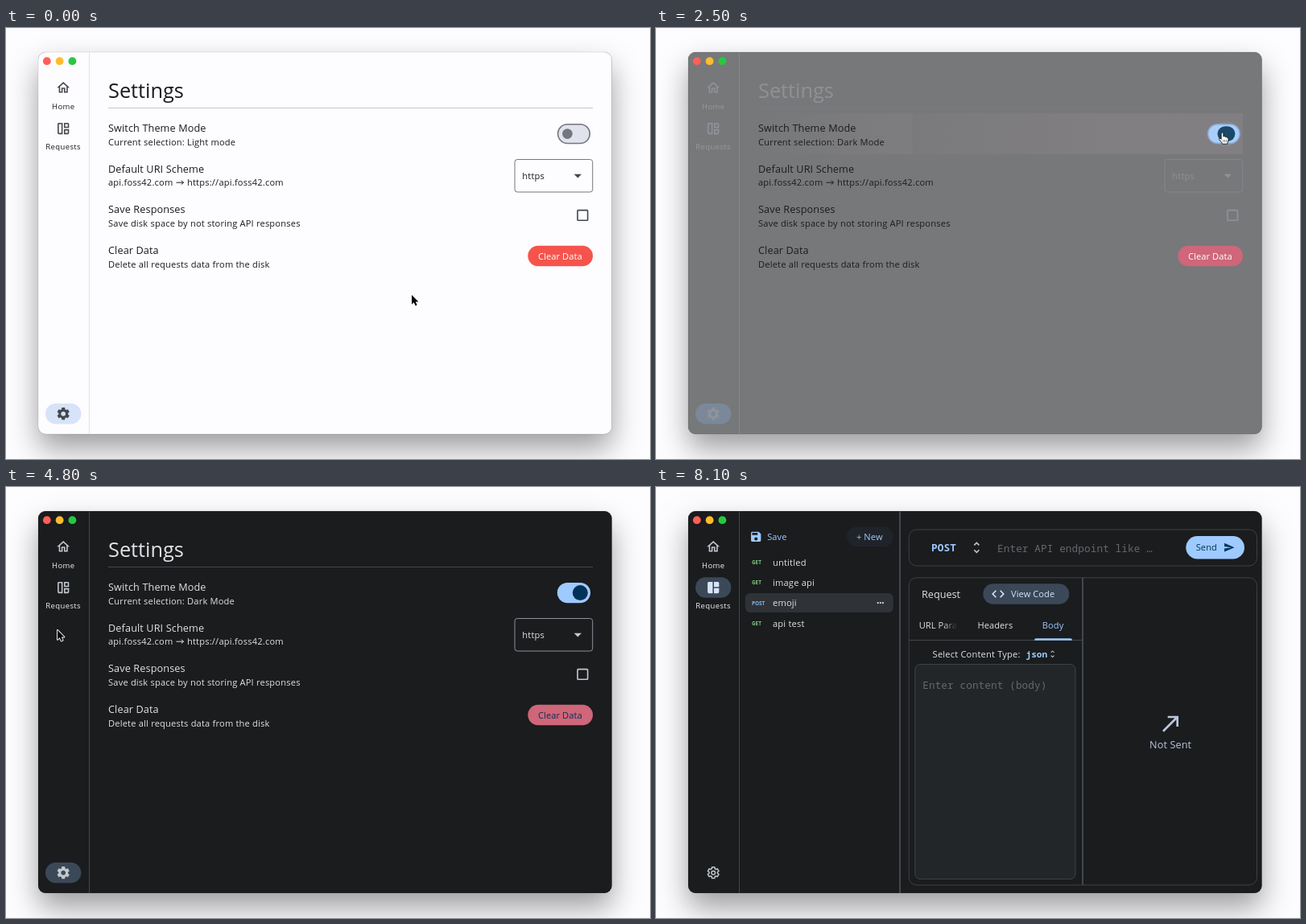
Animation, 800 px wide and 536 px high, one loop 8.79 s. Source, as an HTML page with a canvas:

```html
<!DOCTYPE html>
<html lang="en">
<head>
<meta charset="utf-8">
<title>Settings</title>
<style>
  html, body { margin: 0; width: 100%; height: 100%; overflow: hidden; background: #fdfdff; }
  canvas { display: block; width: 800px; height: 536px; }
</style>
</head>
<body>
<canvas id="stage"></canvas>
<script>
const W = 800, H = 536, LOOP = 8790, STEP = 100;
const canvas = document.getElementById('stage');
const dpr = window.devicePixelRatio || 1;
canvas.width = W * dpr;
canvas.height = H * dpr;
const ctx = canvas.getContext('2d');
const SANS = '"Open Sans", "Noto Sans", sans-serif';
const MONO = '"Noto Sans Mono", "DejaVu Sans Mono", monospace';

const TEXT = '#e2e2e6', BLUE = '#9ecaff', NAVY = '#003258';
const MUTED = '#c3c7cf', LINE = '#43474e', PILL = '#3b4858';

const ICONS = {
  home: 'M12 5.69l5 4.5V18h-2v-6H9v6H7v-7.81l5-4.5M12 3L2 12h3v8h6v-6h2v6h6v-8h3z',
  mosaic: 'M3 5v14c0 1.1.9 2 2 2h6V3H5c-1.1 0-2 .9-2 2zm6 14H5V5h4zM19 3h-6v8h8V5c0-1.1-.9-2-2-2zm0 6h-4V5h4zM13 21h6c1.1 0 2-.9 2-2v-6h-8zm2-6h4v4h-4z',
  mosaicFull: 'M3 5v14c0 1.1.9 2 2 2h6V3H5c-1.1 0-2 .9-2 2zM19 3h-6v8h8V5c0-1.1-.9-2-2-2zM13 21h6c1.1 0 2-.9 2-2v-6h-8z',
  save: 'M17 3H5c-1.1 0-2 .9-2 2v14c0 1.1.9 2 2 2h14c1.1 0 2-.9 2-2V7zM12 19a3 3 0 1 1 0-6 3 3 0 0 1 0 6zM15 9H5V5h10z',
  unfold: 'M12 5.83L15.17 9l1.41-1.41L12 3 7.41 7.59 8.83 9zM12 18.17L8.83 15l-1.41 1.41L12 21l4.59-4.59L15.17 15z',
  send: 'M2 21L23 12 2 3v7l15 2-15 2z',
  code: 'M9.4 16.6L4.8 12l4.6-4.6L8 6l-6 6 6 6zM14.6 16.6l4.6-4.6-4.6-4.6L16 6l6 6-6 6z',
  northEast: 'M9 5v2h6.59L4 18.59 5.41 20 17 8.41V15h2V5z'
};
for (const name in ICONS) ICONS[name] = new Path2D(ICONS[name]);

const ARROW = new Path2D('M0 0V11.8L2.7 9.3 4.6 13.5 6.6 12.6 4.8 8.6H8.4Z');
const HAND = new Path2D('M-1.4 1Q0-1 1.4 1V5Q3 4 4 5.5Q5.5 4.9 6 6.3Q7.8 6 7.6 8.2L7.2 11 6 14.2H0L-1 12.2-4 8.4Q-4 6.5-2.5 7.2L-1.4 8.4Z');

// Pointer waypoints: time, x, y
const POINTER = [
  [0, 504, 332], [100, 514, 322], [300, 600, 215], [500, 658, 136.5], [700, 658, 136.5],
  [900, 682, 133], [1100, 703.5, 130], [4300, 703.5, 130], [4400, 685, 150], [4500, 520, 194],
  [4600, 290, 206], [4700, 110, 206], [4800, 64, 178], [5000, 68, 151], [5200, 71, 137],
  [5300, 71, 137], [5500, 70, 136], [7000, 70, 136], [7100, 75.5, 135.5], [7200, 150, 150],
  [7300, 330, 172], [7400, 520, 184], [7500, 655, 184]
];

const clamp = v => Math.max(0, Math.min(1, v));
const lerp = (a, b, k) => a + (b - a) * k;
const rgb = hex => [1, 3, 5].map(i => parseInt(hex.slice(i, i + 2), 16));
function mix(a, b, k) {
  const to = rgb(b);
  return `rgb(${rgb(a).map((v, i) => Math.round(lerp(v, to[i], k)))})`;
}

function text(str, x, y, color, size = 11.08, spacing = 0.2, font = SANS, weight = 400) {
  ctx.font = `${weight} ${size}px ${font}`;
  ctx.letterSpacing = spacing + 'px';
  ctx.fillStyle = color;
  ctx.fillText(str, x, y);
}

function box(x, y, w, h, r, fill, stroke, line = 1) {
  ctx.beginPath();
  ctx.roundRect(x, y, w, h, r);
  if (fill) { ctx.fillStyle = fill; ctx.fill(); }
  if (stroke) { ctx.strokeStyle = stroke; ctx.lineWidth = line; ctx.stroke(); }
}

function rect(x, y, w, h, color) {
  ctx.fillStyle = color;
  ctx.fillRect(x, y, w, h);
}

function disc(x, y, r, color) {
  ctx.beginPath();
  ctx.arc(x, y, r, 0, Math.PI * 2);
  ctx.fillStyle = color;
  ctx.fill();
}

function icon(name, cx, cy, size, color) {
  ctx.save();
  ctx.translate(cx - size / 2, cy - size / 2);
  ctx.scale(size / 24, size / 24);
  ctx.fillStyle = color;
  ctx.fill(ICONS[name], 'evenodd');
  ctx.restore();
}

function gear(cx, cy, color, filled) {
  const outer = filled ? 7.9 : 7.1, inner = filled ? 5.9 : 5.2, hole = filled ? 2.8 : 2.3;
  const deg = Math.PI / 180;
  ctx.beginPath();
  for (let tooth = 0; tooth < 6; tooth++) {
    for (const [r, a] of [[inner, -22], [outer, -14], [outer, 14], [inner, 22]]) {
      const angle = (tooth * 60 + 90 + a) * deg;
      ctx.lineTo(cx + r * Math.cos(angle), cy + r * Math.sin(angle));
    }
  }
  ctx.closePath();
  ctx.moveTo(cx + hole, cy);
  ctx.arc(cx, cy, hole, 0, Math.PI * 2);
  ctx.lineJoin = 'round';
  ctx.lineWidth = 1.5;
  ctx.fillStyle = ctx.strokeStyle = color;
  if (filled) ctx.fill('evenodd'); else ctx.stroke();
}

function drawWindow(p) {
  rect(0, 0, W, H, '#fdfdff');
  ctx.save();
  ctx.shadowColor = 'rgba(0,0,0,.38)';
  ctx.shadowBlur = 36 * dpr;
  ctx.shadowOffsetY = 18 * dpr;
  box(40, 30, 712.5, 475, 9, '#888888');
  ctx.restore();
  box(40, 30, 712.5, 475, 9, mix('#fdfcff', '#1a1c1e', p), 'rgba(0,0,0,.14)', 0.7);
  ['#ff5f57', '#febc2e', '#28c840'].forEach((c, i) => disc(50.8 + i * 15.8, 41.2, 4.9, c));
}

function drawRail(t, p) {
  const onRequests = t >= 5700;
  const label = mix('#1a1c1e', '#f0f0f4', p);
  const tint = mix('#43474e', MUTED, p);
  const navTint = p > 0 && p < 0.5 ? '#0c0d0f' : tint;
  rect(103, 30.5, 1, 474.5, mix('#e2e2e6', '#43474e', p));
  if (onRequests) {
    box(49, 112.3, 44.4, 25.4, 12.7, PILL);
    const splash = clamp((6200 - t) / 500) * 0.12;
    if (splash) box(49, 112.3, 44.4, 25.4, 12.7, `rgba(215,227,248,${splash})`);
  } else {
    box(49, 467, 44.4, 25.4, 12.7, mix('#d7e3f8', PILL, p));
    if (t >= 5100) box(49, 112.3, 44.4, 25.4, 12.7, 'rgba(195,199,207,.08)');
  }
  icon('home', 71.2, 74.2, 19, navTint);
  icon(onRequests ? 'mosaicFull' : 'mosaic', 71.2, 125, 19, onRequests ? '#d7e3f8' : navTint);
  gear(71.2, 479.7, tint, !onRequests);
  text('Home', 57, 100.6, label, 9.5, 0.4);
  text('Requests', 49.2, 151.2, label, 9.5, 0.4);
}

function drawSwitch(t, p) {
  const q = clamp((t - 2250) / 300) * (t >= 2400);
  const hover = t >= 1000 && t < 4400;
  const bump = Math.sin(Math.PI * q);
  const cx = lerp(697.4, 713.3, q * q), cy = 131.6;
  const w = lerp(12.7, 19, q) + 8 * bump, h = lerp(12.7, 19, q) + 2 * bump;
  box(685.6, 119.7, 39.6, 23.8, 11.9, mix('#e0e2ec', BLUE, q), mix('#74777f', BLUE, q ** 3), 1.6);
  if (hover) disc(cx, cy, 15.6, p > 0.5 ? 'rgba(158,202,255,.08)' : 'rgba(26,28,30,.08)');
  const off = hover ? '#43474e' : '#74777f', on = hover ? '#00497d' : NAVY;
  box(cx - w / 2, cy - h / 2, w, h, h / 2, mix(off, on, q ** 3));
}

function drawRipple(t) {
  if (t < 2400 || t >= 2600) return;
  const k = (t - 2400) / 100;
  ctx.save();
  ctx.beginPath();
  ctx.rect(127, 106.3, 602, 50.5);
  ctx.clip();
  const wash = ctx.createLinearGradient(127, 0, 560, 0);
  wash.addColorStop(0, 'rgba(225,200,210,0)');
  wash.addColorStop(1, 'rgba(225,200,210,.15)');
  rect(127, 106, 602, 51, wash);
  disc(703, 131.6, 125 + 260 * k, `rgba(20,20,22,${0.075 - 0.04 * k})`);
  ctx.restore();
}

function drawSettings(t, p) {
  const lag = clamp((t - 2510) / 200);
  const dark = t >= 2400;
  const main = mix('#1a1c1e', TEXT, p), body = mix('#1a1c1e', TEXT, lag);
  const tint = mix('#43474e', MUTED, p), edge = mix('#74777f', '#8d9199', p);
  text('Settings', 127, 86.8, main, 25.33, 0);
  rect(127, 99, 602, 1, mix('#c3c7cf', '#43474e', p));
  drawRipple(t);
  const rows = [
    ['Switch Theme Mode', 'Current selection: ' + (dark ? 'Dark Mode' : 'Light mode')],
    ['Default URI Scheme', 'api.foss42.com'],
    ['Save Responses', 'Save disk space by not storing API responses'],
    ['Clear Data', 'Delete all requests data from the disk']
  ];
  rows.forEach(([title, sub], i) => {
    const y = 129 + i * 50.67;
    text(title, 127, y, body, 12.67, 0.12);
    text(sub, 127, y + 16.7, body);
  });
  text('https://api.foss42.com', 225, 196.4, body);
  ctx.beginPath();
  ctx.moveTo(211.5, 192.2);
  ctx.lineTo(220.5, 192.2);
  ctx.moveTo(217.8, 189.8);
  ctx.lineTo(220.5, 192.2);
  ctx.lineTo(217.8, 194.6);
  ctx.strokeStyle = body;
  ctx.lineWidth = 1;
  ctx.stroke();

  drawSwitch(t, p);
  box(632, 163.5, 96.7, 40.5, 3.2, null, edge);
  text('https', 641.3, 187.7, main);
  ctx.beginPath();
  ctx.moveTo(705.6, 181.8);
  ctx.lineTo(715, 181.8);
  ctx.lineTo(710.3, 186.5);
  ctx.fillStyle = tint;
  ctx.fill();
  box(710, 226.6, 12.6, 12.6, 0.8, null, tint, 1.6);
  box(648.3, 270.8, 80.7, 25.4, 12.7, dark ? '#cf6679' : '#f5544d');
  text('Clear Data', 661, 287.5, mix('#ffffff', NAVY, lag), 11.08, 0.08);
}

function drawSidebar() {
  icon('save', 124.2, 61.8, 16.4, BLUE);
  text('Save', 138.2, 66, BLUE, 11.08, 0.08);
  box(237, 49.5, 58, 24.6, 12.3, '#202329');
  text('+ New', 249, 66, BLUE, 11.08, 0.08);
  box(110.8, 132, 184, 24, 6.3, '#2f3236');
  const items = [['GET', 'untitled'], ['GET', 'image api'], ['POST', 'emoji'], ['GET', 'api test']];
  items.forEach(([verb, name], i) => {
    const y = 97.6 + i * 25.34;
    text(verb, 119, y - 1.5, verb === 'GET' ? '#81c784' : '#82b8f0', 6.33, 0, SANS, 700);
    text(name, 145, y, TEXT);
  });
  for (let i = -1; i <= 1; i++) disc(278.8 + i * 3.1, 144.1, 1.1, TEXT);
  rect(302, 30.5, 2, 474.5, LINE);
}

function drawRequests() {
  drawSidebar();
  box(314.2, 53, 432.3, 45, 9.5, null, '#3c4046');
  text('POST', 342, 80.2, BLUE, 12.67, 0.12, MONO, 600);
  icon('unfold', 398.3, 75.3, 19, MUTED);
  text('Enter API endpoint like …', 424, 80.8, '#65686d', 12.67, 0.12, MONO);
  box(658.3, 61, 72.7, 28.5, 14.25, BLUE);
  text('Send', 670.7, 79.2, NAVY, 11.08, 0.08);
  icon('send', 712, 75.2, 14.25, NAVY);

  box(314.2, 112.8, 432.3, 382.2, 9.5, null, '#3c4046');
  rect(529, 113, 2, 382, LINE);
  text('Request', 330, 137.7, TEXT, 12.67, 0);
  box(406.3, 120.3, 107, 25.4, 12.7, PILL);
  icon('code', 425, 133, 19, '#d7e3f8');
  text('View Code', 441, 137.2, '#d7e3f8', 11.08, 0.08);

  const fade = ctx.createLinearGradient(357, 0, 374, 0);
  fade.addColorStop(0, TEXT);
  fade.addColorStop(1, 'rgba(226,226,230,0)');
  text('URL Params', 326.7, 175.6, fade, 11.08, 0.08);
  text('Headers', 399.4, 175.6, TEXT, 11.08, 0.08);
  text('Body', 479.8, 175.6, BLUE, 11.08, 0.08);
  rect(314.5, 190, 215, 1, LINE);
  box(470, 188.2, 47, 2.6, [2.4, 2.4, 0, 0], BLUE);

  text('Select Content Type:', 343.6, 211.7, TEXT);
  text('json', 459.5, 211.7, BLUE, 11.08, 0, MONO, 600);
  icon('unfold', 492.6, 207.7, 12, MUTED);
  box(321.8, 220.6, 199.2, 267, 6.3, '#232628', '#3f4349');
  text('Enter content (body)', 331.2, 251.2, '#65696e', 12.67, 0.12, MONO);

  icon('northEast', 639.7, 294, 32, '#bbc7db');
  text('Not Sent', 613, 324.6, '#bbc7db', 12.67, 0.12);
}

function drawPointer(t) {
  if (t >= 7600) return;
  let i = POINTER.findIndex(point => point[0] > t);
  if (i < 0) i = POINTER.length - 1;
  const [t0, x0, y0] = POINTER[i - 1], [t1, x1, y1] = POINTER[i];
  const k = clamp((t - t0) / (t1 - t0));
  const hand = (t >= 500 && t < 4400) || (t >= 5100 && t < 7200);
  ctx.save();
  ctx.translate(lerp(x0, x1, k), lerp(y0, y1, k));
  ctx.lineJoin = 'round';
  if (hand) {
    ctx.fillStyle = '#fff';
    ctx.strokeStyle = '#111';
    ctx.lineWidth = 0.9;
    ctx.fill(HAND);
    ctx.stroke(HAND);
    for (let n = 0; n < 3; n++) rect(1 + n * 1.9, 9, 0.6, 3, '#333');
  } else {
    ctx.strokeStyle = '#fff';
    ctx.lineWidth = 1.8;
    ctx.stroke(ARROW);
    ctx.fillStyle = '#000';
    ctx.fill(ARROW);
  }
  ctx.restore();
}

function render(now) {
  const t = Math.floor((now % LOOP) / STEP) * STEP;
  const p = clamp((t - 2382) / 200);
  ctx.setTransform(dpr, 0, 0, dpr, 0, 0);
  drawWindow(p);
  drawRail(t, p);
  if (t < 5700) drawSettings(t, p); else drawRequests();
  drawPointer(t);
}

const start = performance.now();
function tick() {
  render(performance.now() - start);
  requestAnimationFrame(tick);
}
tick();
</script>
</body>
</html>
```
